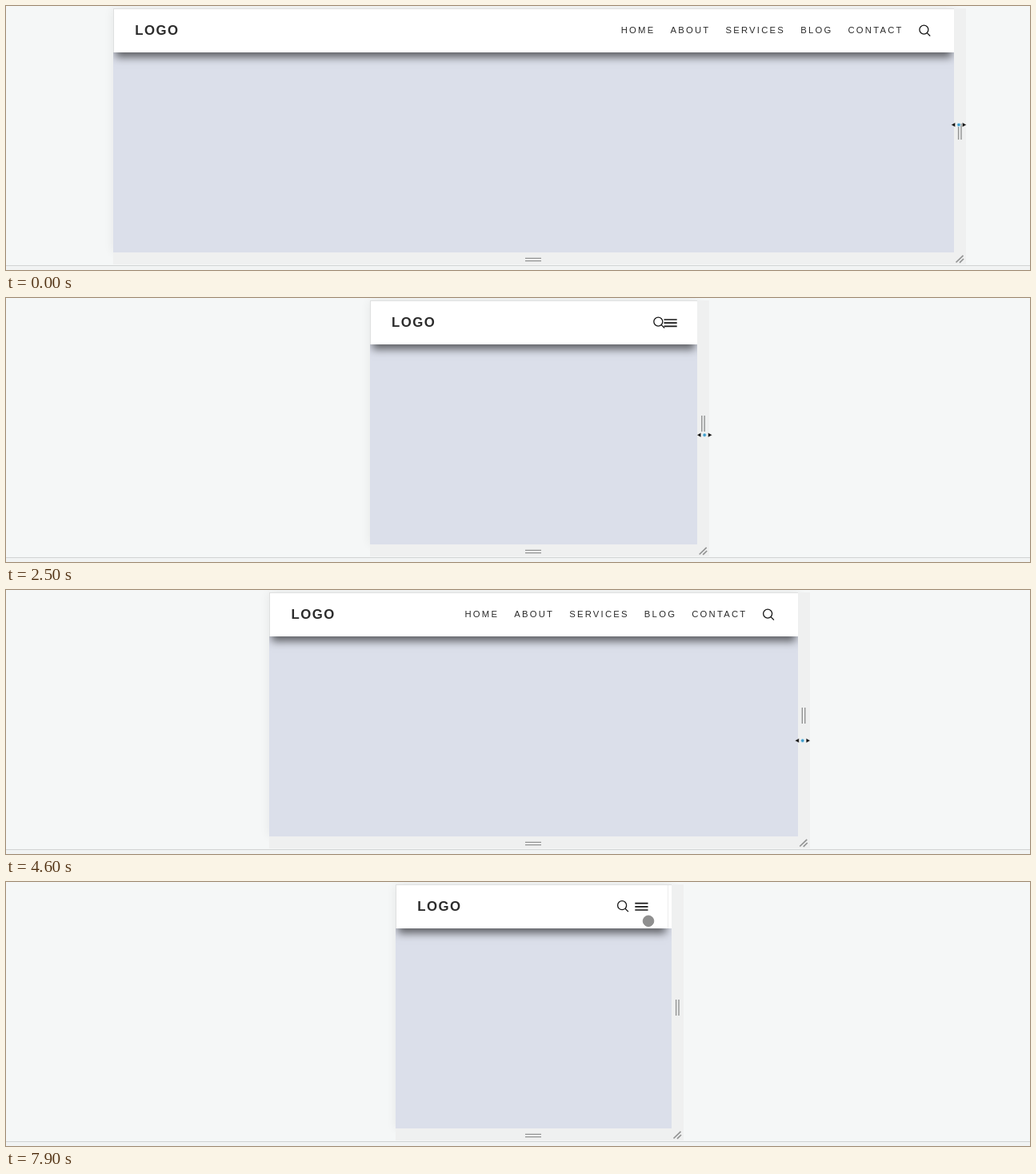
Write an HTML page that moves like this. It is 1280 px wide and 330 px high and loops after 8000 ms.

```html
<!DOCTYPE html>
<html lang="en">
<head>
<meta charset="utf-8">
<title>Responsive header</title>
<style>
  html, body { margin: 0; width: 100%; height: 100%; overflow: hidden; background: #f5f7f7; }
  #stage { position: relative; width: 1280px; height: 330px; overflow: hidden; --l: 134px; --w: 1051px; }
  #stage div, #stage svg { position: absolute; box-sizing: border-box; }
  #stage svg { overflow: visible; }
  .floor { left: 0; top: 324px; width: 1280px; height: 6px; background: #f1f3f3; border-top: 1px solid #d1d4d4; }
  .device { left: var(--l); top: 3px; width: calc(var(--w) + 15px); height: 320px; }
  .page { left: 0; top: 0; width: var(--w); height: 305px; background: #dbdfea; box-shadow: 0 0 12px rgba(0, 0, 0, .07); }
  .clip, #bars { inset: 0; overflow: hidden; }
  .strip { background: #eff0f0; }
  .side { left: var(--w); top: 0; width: 15px; height: 320px; }
  .foot { left: 0; top: 305px; width: 100%; height: 15px; }
  .shade, .header { left: 0; top: 0; right: 0; height: 55px; }
  .shade { box-shadow: 0 9px 10px -3px rgba(0, 0, 0, .58); }
  .header { background: #fff; border: solid #dfe0e0; border-width: 1px 0 0 1px; }
  .tight .shade { right: 4px; }
  .tight .header::after { content: ""; position: absolute; right: 4px; top: 0; width: 1px; height: 100%; background: #ececec; }
  .bar { background: #74747f; opacity: .55; border-radius: 1px; }
  .bar.v { right: 3px; top: 4px; width: 2px; height: 146px; }
  .bar.h { left: 3px; top: 300.5px; width: 49%; height: 2.5px; }
  text { font-family: "Liberation Sans", Arial, sans-serif; fill: #2b2b2b; }
  .logo { font-size: 16.8px; font-weight: bold; letter-spacing: 1.5px; }
  #nav { font-size: 11.25px; letter-spacing: 2.25px; text-anchor: end; }
  .ink { fill: none; stroke: #161616; }
  .grip { fill: none; stroke: #929393; stroke-width: 1.4; }
</style>
</head>
<body>
<div id="stage">
  <div class="floor"></div>
  <div class="device">
    <div class="page">
      <div class="clip">
        <div class="shade"></div>
        <div class="header"></div>
        <div id="bars">
          <div class="bar v"></div>
          <div class="bar h"></div>
        </div>
      </div>
    </div>
    <div class="strip side"></div>
    <div class="strip foot"></div>
  </div>
  <svg width="1280" height="330">
    <g id="left"><text class="logo" x="27.2" y="36.2">LOGO</text></g>
    <g id="right">
      <text id="nav" x="-63.3" y="34"></text>
      <g id="search" class="ink" stroke-width="1.3">
        <circle cx="-37.6" cy="29.6" r="5.5"/>
        <path d="M-33.7 33.6L-29.8 37.5"/>
      </g>
      <path id="burger" class="ink" stroke-width="1.7" d="M-41.7 27H-25.5M-41.7 31.2H-25.5M-41.7 35.4H-25.5"/>
    </g>
    <path class="grip" d="M649 315.4H669M649 318.6H669"/>
    <g id="grips" class="grip">
      <path d="M5.6 147V167M9 147V167"/>
      <path stroke-width="1.7" d="M2.5 320.5L11.5 311.8M7 320.8L12 316"/>
    </g>
    <g id="resize">
      <path d="M-9.5 0L-4.5 -2.7V2.7ZM9.5 0L4.5 -2.7V2.7Z" fill="#111" stroke="#fff" stroke-opacity=".55" stroke-width=".6"/>
      <circle r="2.2" fill="#3f9ccb" stroke="#d5ecf5" stroke-width=".8"/>
    </g>
    <circle id="touch" r="6.8" fill="#8f8f8f" stroke="#858585" stroke-width=".8"/>
  </svg>
</div>
<script>
const LOOP = 8000, STEP = 100, SPAN = 1319, BREAKPOINT = 576;
const TIGHT = 7100, RELEASE = 7300, REST = 7900;
const $ = id => document.getElementById(id);
const clamp = v => Math.min(1, Math.max(0, v));
const easeOut = (t, from, to, power = 1) => 1 - (1 - clamp((t - from) / (to - from))) ** power;
const mix = (a, b, u) => a + (b - a) * u;

// Pulls of the resize handle: the left edge goes to x, the pointer trails by lag.
const drags = [
  { from: 800, to: 1200, x: 102 },
  { from: 1500, to: 3500, x: 470, power: 4.6, lag: 40 },
  { from: 3150, to: 4300, x: 180, lag: 80 },
  { from: 4300, to: 5000, x: 382, power: 2.4 },
  { from: 5400, to: 6000, x: 415.5 },
  { from: 6100, to: 6300, x: 442 },
  { from: 6400, to: 7100, x: 487, power: 2 }
];
const edge = (t, trail = 0) => drags.reduce((x, d) =>
  mix(x, d.x, easeOut(t - trail * (d.lag || 0), d.from, d.to, d.power)), 134);
const isSmall = t => SPAN - 2 * edge(t) < BREAKPOINT;

// The search icon slides over nine steps after the layout switches.
function slide(t) {
  let n = 0;
  for (let k = 1; k <= 9; k++) n += isSmall(t - k * STEP);
  return -20.3 * n / 9;
}

const flash = (t, start) => t < start ? 0 : clamp((start + 600 - t) / 300);

$("nav").innerHTML = ["HOME", "ABOUT", "SERVICES", "BLOG", "CONTACT"]
  .map((label, i) => `<tspan dx="${i ? 19 : 0}">${label}</tspan>`).join("");

const move = (id, x, y = 0) => $(id).setAttribute("transform", `translate(${x} ${y})`);
const show = (id, on) => { $(id).style.display = on ? "" : "none"; };

function draw(now) {
  const t = Math.floor(now % LOOP / STEP) * STEP;
  const l = edge(t), r = SPAN - l;
  const small = isSmall(t), tight = t >= TIGHT;
  const away = easeOut(t, RELEASE, REST);
  const x = mix(SPAN - edge(t, 1) + 6, 803, away);
  const y = mix(mix(148.5, 191.5, easeOut(t, 900, 6000, 2)), 48.8, away);
  const touching = t > RELEASE && x < r;
  const stage = $("stage");
  stage.style.setProperty("--l", l + "px");
  stage.style.setProperty("--w", r - l + "px");
  stage.classList.toggle("tight", tight);
  move("left", l, tight ? -.6 : 0);
  move("right", r - (tight ? 4 : 0), tight ? -.4 : 0);
  move("grips", r);
  move("search", slide(t));
  show("nav", !small);
  show("burger", small);
  $("bars").style.opacity = Math.max(flash(t, 3300), flash(t, TIGHT));
  show("touch", touching);
  show("resize", !touching);
  move(touching ? "touch" : "resize", x, y);
}

const start = performance.now();
function tick() {
  draw(performance.now() - start);
  requestAnimationFrame(tick);
}
tick();
</script>
</body>
</html>
```
